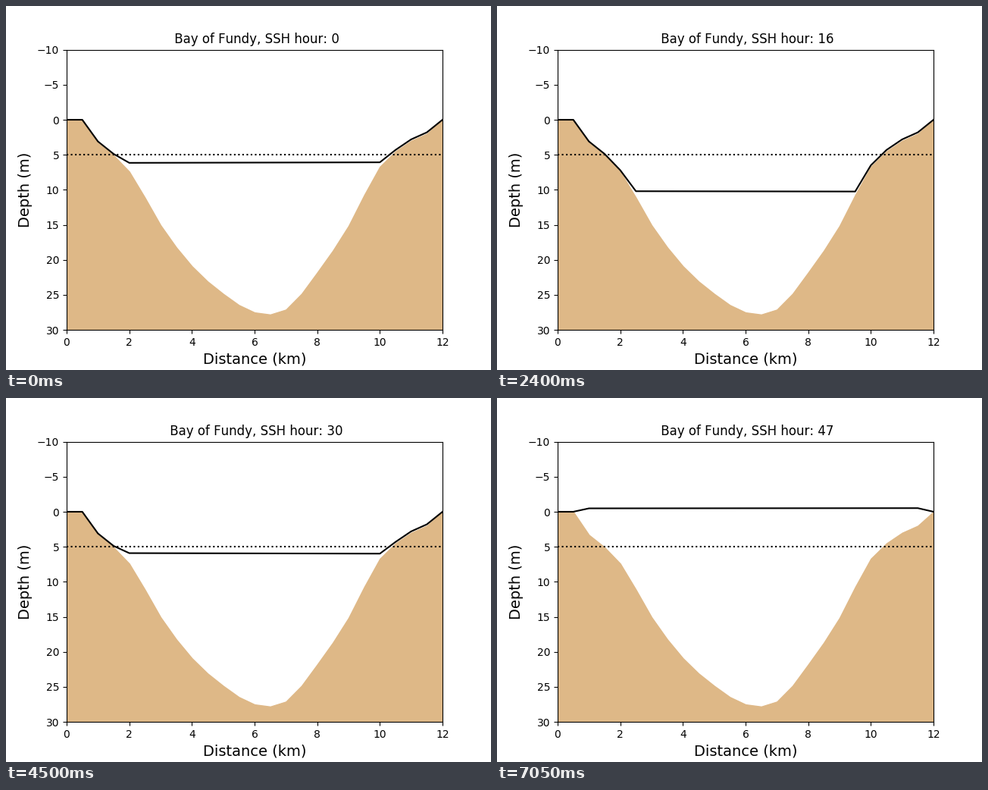
Animation, 640 px wide and 480 px high, one loop 7.2 s. Source, as a matplotlib script:

```python
import numpy as np
import matplotlib.pyplot as plt
from matplotlib.animation import FuncAnimation

HOURS = 48
STEP_MS = 150
LUNAR_DAY = 24.8

# Depth at each km; the first and last values only steer the curve at the banks
KEY_DEPTHS = np.array([22.3, 0, 3.3, 7.4, 15.05, 20.9, 24.85, 27.5,
                       27.1, 21.8, 15.15, 6.7, 3.0, 0, -11.7])


def refine(keys):
    """Insert a smooth four-point midpoint between neighbouring keys."""
    a, b, c, d = keys[:-3], keys[1:-2], keys[2:-1], keys[3:]
    out = np.empty(2 * len(b) + 1)
    out[::2] = keys[1:-1]
    out[1::2] = (9 * (b + c) - (a + d)) / 16
    return out


bed = refine(KEY_DEPTHS)
x = np.linspace(0, 12, len(bed))


def tide(hour):
    day = 2 * np.pi / LUNAR_DAY
    phase = 2 * day * (hour - 2.55)
    return (4.75 + 6.35 * np.cos(phase) + 0.6 * np.cos(2 * phase)
            + 0.3 * np.cos(day * (hour - 4.5)))


def surface(hour):
    # The tide reaches the far bank slightly later
    level = tide(hour - 0.0027 * (x - 6))
    return np.where(bed > 0.1, np.minimum(level, bed - 0.2), 0)


plt.rcParams["font.family"] = "DejaVu Sans"
plt.rcParams["text.kerning_factor"] = 6

fig, ax = plt.subplots(figsize=(6.4, 4.8), dpi=100)
ax.fill_between(x, bed, 30, color="burlywood")
ax.plot([0, 12], [5, 5], "k:", lw=1.5)
water, = ax.plot(x, surface(0), "k-", lw=1.5)
ax.set_xlim(0, 12)
ax.set_ylim(30, -10)
ax.set_xlabel("Distance (km)", fontsize=14)
ax.set_ylabel("Depth (m)", fontsize=14)
title = ax.set_title("")


def update(hour):
    water.set_ydata(surface(hour))
    title.set_text(f" Bay of Fundy, SSH hour: {hour}")
    return water, title


anim = FuncAnimation(fig, update, frames=HOURS, interval=STEP_MS,
                     repeat=True, repeat_delay=0, blit=False)
plt.show()
```
